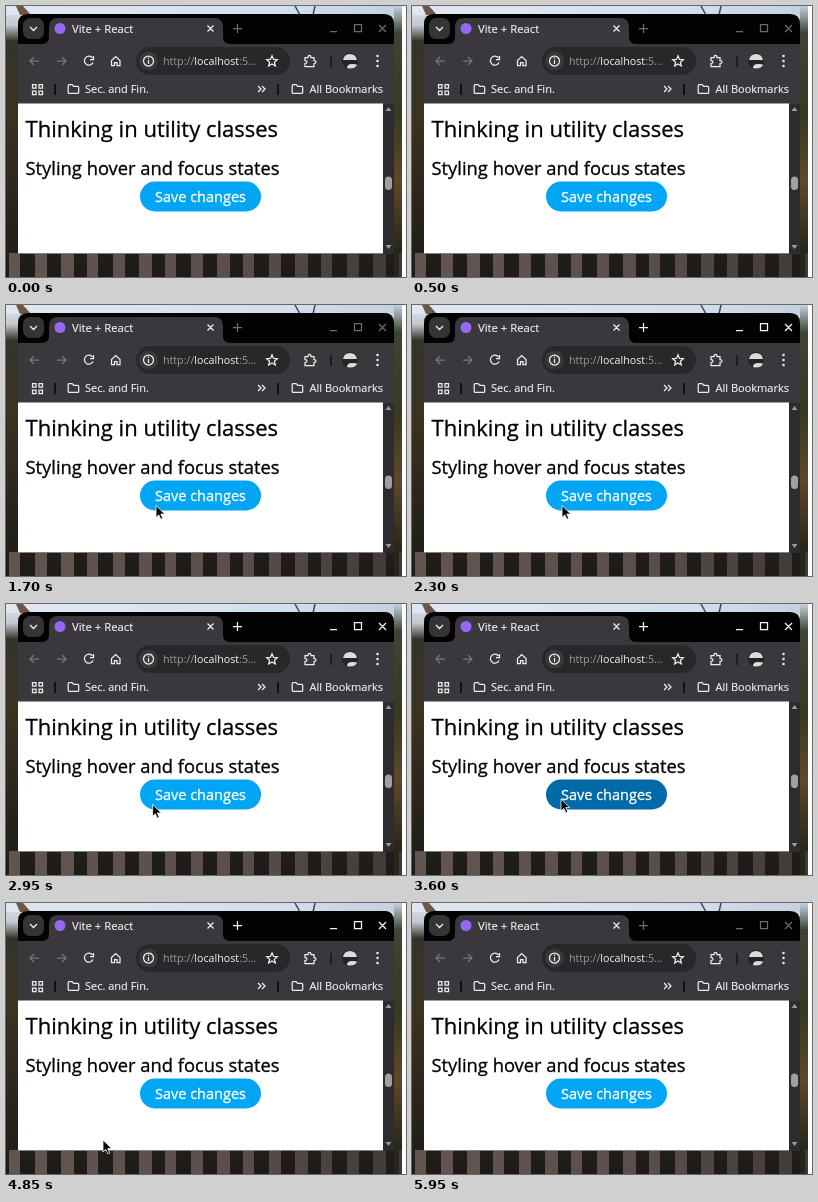
These frames come from a looping animation (400 px wide and 271 px high, 6000 ms). An HTML page:

```html
<!DOCTYPE html>
<html lang="en">
<head>
<meta charset="utf-8">
<title>Button hover</title>
<style>
html, body { margin: 0; width: 100%; height: 100%; overflow: hidden; background: #fff; }
svg { display: block; width: 400px; height: 271px; }
text { font-family: "Open Sans", "Noto Sans", sans-serif; }
.page text { stroke: #000; stroke-width: .3; }
.page .label { fill: #fff; stroke: #fff; }
.ui text { font-size: 11px; fill: #f2f2f2; stroke: #f2f2f2; stroke-width: .15; }
.ui .url { font-size: 10.7px; fill: #9a9a9a; stroke: none; }
.line { fill: none; stroke: #ededed; stroke-width: 1.25; }
.dim { stroke: #78767a; }
</style>
</head>
<body>
<svg viewBox="0 0 400 271">
  <defs>
    <linearGradient id="trees" x2="0" y2="1">
      <stop offset="0" stop-color="#dce3ee"/>
      <stop offset=".07" stop-color="#c5c9d0"/>
      <stop offset=".13" stop-color="#34332b"/>
      <stop offset=".4" stop-color="#3b3320"/>
      <stop offset=".7" stop-color="#2b261c"/>
      <stop offset="1" stop-color="#1d1a19"/>
    </linearGradient>
    <linearGradient id="sky">
      <stop offset="0" stop-color="#dfe6f0"/>
      <stop offset=".3" stop-color="#dce5f0"/>
      <stop offset=".7" stop-color="#d3dfed"/>
      <stop offset="1" stop-color="#c3d0df"/>
    </linearGradient>
    <linearGradient id="side" x2="0" y2="1">
      <stop offset="0" stop-color="#c3d0df"/>
      <stop offset=".1" stop-color="#3d4532"/>
      <stop offset=".4" stop-color="#383920"/>
      <stop offset=".65" stop-color="#5e4929"/>
      <stop offset=".9" stop-color="#292719"/>
      <stop offset="1" stop-color="#25231c"/>
    </linearGradient>
    <linearGradient id="wood" gradientUnits="userSpaceOnUse" x2="396">
      <stop offset="0" stop-color="#61564f"/>
      <stop offset=".6" stop-color="#594e4b"/>
      <stop offset="1" stop-color="#3f3935"/>
    </linearGradient>
    <path id="folder" class="line" d="M.7 1.7q0-1 1-1h3l1.5 1.7h4q1 0 1 1v5q0 1-1 1H1.700q-1 0-1-1z"/>
  </defs>

  <rect width="396" height="271" fill="url(#trees)"/>
  <rect width="396" height="9" fill="url(#sky)"/>
  <path d="M10 0h7l8 9H14z" fill="#6d5848"/>
  <path d="M289 0l5 9M309 0l-2 9" stroke="#33466a" stroke-width="1.5"/>
  <rect x="388" width="8" height="271" fill="url(#side)"/>
  <g id="fence" fill="url(#wood)"></g>

  <g class="ui">
    <path d="M12 98V18q0-10 10-10h356q10 0 10 10v230H12z" fill="#020202"/>
    <path d="M12 98V38h24q7 0 7-7V21q0-9 9-9h156q9 0 9 9v10q0 7 7 7h164v60z" fill="#3a383c"/>
    <rect x="17" y="12" width="21" height="21" rx="7" fill="#343336"/>
    <path class="line" d="M24 21l3.500 3.500 3.500-3.500M201.500 19.500l6 6m0-6l-6 6"/>
    <circle cx="54" cy="22.500" r="5.500" fill="#9568f3"/>
    <text x="66" y="26.500" style="font-size:11.3px">Vite + React</text>
    <path id="controls" class="line" d="M227 22.500h9M231.500 18v9M324 25.500h7M348.500 18.500h7v7h-7zM373 19l7 7m0-7l-7 7"/>

    <path class="line dim" d="M33 55h-9m4-4l-4 4 4 4M51 55h9m-4-4l4 4-4 4"/>
    <path class="line" d="M86.500 52a4.500 4.500 0 1 0 .5 4.500M87.500 50v3.500H84M105.500 54.500v5h3v-3h2.500v3h3v-5l-4.300-4z"/>
    <rect x="130" y="41" width="154" height="28" rx="14" fill="#282729"/>
    <circle cx="142.500" cy="55" r="9.500" fill="#3a383c"/>
    <circle class="line" cx="142.500" cy="55" r="5"/>
    <path class="line" d="M142.500 54v4M142.500 51.500v1.300"/>
    <text class="url" x="157" y="59">http://<tspan fill="#f2f2f2">localhost</tspan>:5…</text>
    <path class="line" d="M266 49.800l1.500 3.600 3.800.3-2.900 2.500.9 3.800-3.300-2.100-3.300 2.100.9-3.800-2.900-2.500 3.800-.3z"/>
    <path class="line" d="M299 51.500h3q0-2.200 1.500-2.200t1.500 2.200h3v3q2 0 2 1.500t-2 1.500v3h-9v-3q2 0 2-1.500t-2-1.500z"/>
    <path d="M325 50v11" stroke="#141315" stroke-width="1.500"/>
    <circle cx="344" cy="55" r="8" fill="#242428"/>
    <path d="M337 54q1-6 7-6t7 6zM341 62q0-4 5-4t5 1q-3 5-10 3z" fill="#dddbd5"/>
    <path d="M371.500 50h.01M371.500 55h.01M371.500 60h.01" stroke="#eee" stroke-width="2.500" stroke-linecap="round"/>

    <path class="line" d="M26.500 78.500H30V82h-3.500zM33 78.500h3.500V82H33zM26.500 85H30v3.500h-3.500zM33 85h3.500v3.500H33z"/>
    <path d="M49 78v11M272 78v11" stroke="#101010" stroke-width="2"/>
    <use href="#folder" x="61.500" y="78"/>
    <text x="79" y="87">Sec. and Fin.</text>
    <path class="line" d="M252 80l3 3-3 3M256 80l3 3-3 3"/>
    <use href="#folder" x="285.500" y="78"/>
    <text x="303.500" y="87">All Bookmarks</text>
  </g>

  <g class="page">
    <rect x="12" y="97.500" width="365" height="150" fill="#fff"/>
    <rect x="377" y="98" width="11" height="150" fill="#2c2b2d"/>
    <rect x="379" y="170.500" width="7" height="13.500" rx="3.500" fill="#a0a0a0"/>
    <path d="M379.500 105l3-4 3 4zM379.500 239l3 4 3-4z" fill="#9c9c9c"/>
    <text x="19.500" y="130.500" font-size="22">Thinking in utility classes</text>
    <text x="19.500" y="168.500" font-size="18.35">Styling hover and focus states</text>
    <rect id="button" x="134" y="175.500" width="121" height="30" rx="15"/>
    <text class="label" x="149" y="196" font-size="14.500">Save changes</text>
  </g>
  <path id="cursor" d="M0 0v12l2.800-2.600 2 4.400 2-.9-2-4.300h4z" fill="#080808" stroke="#fff" stroke-width=".8"/>
</svg>
<script>
const $ = id => document.getElementById(id);
const LOOP = 6000;

// time, x, y of the pointer tip
const path = [
  [1000, 95, 275], [1600, 150, 200.500], [2400, 150, 200.500], [2900, 146.500, 200.500],
  [3500, 149, 195], [4350, 149, 195], [4850, 97, 237], [5300, 62, 275]
];

let pickets = '';
for (let i = 0; i < 16; i++) {
  const x = 3 + i * 26;
  pickets += `<rect x="${x}" y="247" width="${Math.min(11 + i % 3, 396 - x)}" height="24"/>`;
}
$('fence').innerHTML = pickets;

function pointerAt(t) {
  const i = path.findIndex(p => p[0] > t);
  if (i < 1) return null;
  const [t0, x0, y0] = path[i - 1], [t1, x1, y1] = path[i];
  const k = (t - t0) / (t1 - t0), e = k * k * (3 - 2 * k);
  return [x0 + (x1 - x0) * e, y0 + (y1 - y0) * e];
}

function draw(now) {
  const t = now % LOOP;
  const pos = pointerAt(t);
  $('cursor').style.display = pos ? '' : 'none';
  if (pos) $('cursor').setAttribute('transform', `translate(${pos})`);
  const hover = t >= 3250 && t < 4500;
  const focused = t >= 2300 && t < 5400;
  $('button').setAttribute('fill', hover ? '#0069a8' : '#00a6f4');
  $('controls').style.stroke = focused ? '#f4f4f4' : '#6c6c6c';
  requestAnimationFrame(draw);
}
requestAnimationFrame(draw);
</script>
</body>
</html>
```
